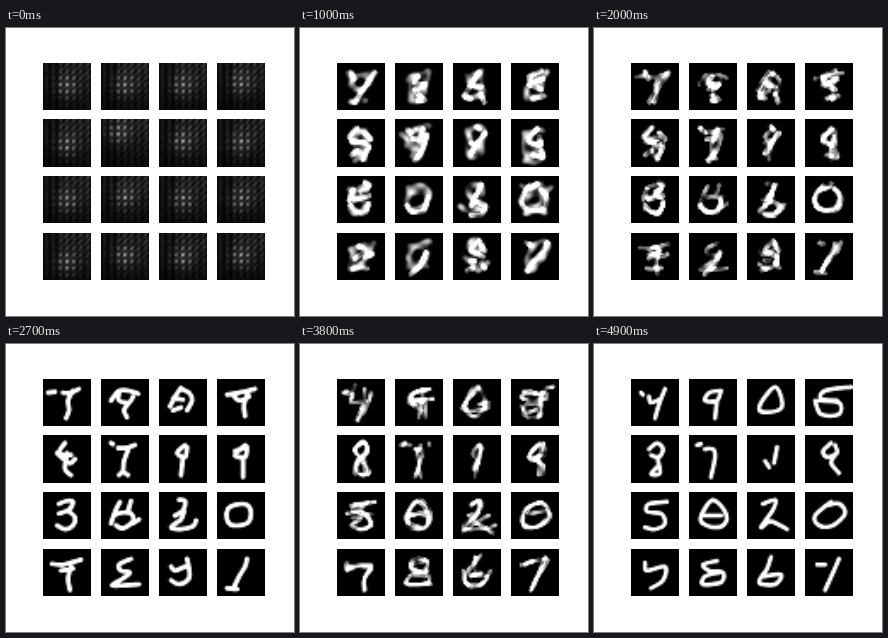
Write an HTML page with a canvas that moves like this. It is 288 by 288 pixels and loops after 5.1 s.

```html
<!DOCTYPE html>
<html>
<head>
<meta charset="utf-8">
<style>
html, body { margin: 0; width: 100%; height: 100%; overflow: hidden; background: #fff; }
canvas { display: block; }
</style>
</head>
<body>
<canvas id="stage" width="288" height="288"></canvas>
<script>
const N = 28, LOOP = 5100, STEP = 100, LAST = 49;
const KEYS = [0, 6, 14, 27, 34, 42, 49];
const WIDTHS = [6.8, 5.4, 4.6, 4.4, 4.3, 4.2];
const BLURS = [.9, .7, .7, .6, .55, .5];
const stage = document.getElementById('stage').getContext('2d');
const tile = document.createElement('canvas');
tile.width = tile.height = N;
const pen = tile.getContext('2d', { willReadFrequently: true });
const clamp = v => Math.max(0, Math.min(1, v));
const cells = [];

function rand(seed) {
  const s = Math.sin(seed * 127.1 + 11.7) * 43758.5453;
  return s - Math.floor(s);
}

// Untrained look: dark stripes with a lattice of bright dots near the middle
function lattice(id) {
  const field = new Float32Array(N * N);
  let cx = 13.5, cy = 11 + rand(id) * 3;
  if (id === 5) { cx = 10; cy = 7; }
  if (id === 12) cy = 17;
  const wave = (v, start) => .5 + .5 * Math.cos((v - start) * Math.PI / 2);
  for (let y = 0; y < N; y++) for (let x = 0; x < N; x++) {
    const near = Math.exp(-((x - cx) ** 2 + (y - cy) ** 2) / 42);
    const grain = .6 + .4 * rand(id * 900 + y * N + x);
    const sx = wave(x, 9.5), sy = wave(y, 8.4);
    const upper = clamp(1.15 - y / N);
    let v = (.03 + .1 * sx) * grain * (.4 + .6 * upper);
    if (x > 9) v += .14 * wave(x + y, 18) * upper * grain;
    v += near * (.08 + .8 * sx ** 2 * sy ** 2 * grain);
    field[y * N + x] = v;
  }
  return field;
}

// Smooth curve through the listed points
function trace(points) {
  const end = points.length - 1;
  const closed = end > 2 && points[0].join() === points[end].join();
  const at = i => closed ? points[(i + end) % end] : points[Math.max(0, Math.min(end, i))];
  pen.moveTo(...points[0]);
  for (let i = 0; i < end; i++) {
    const [a, b, c, d] = [at(i - 1), at(i), at(i + 1), at(i + 2)];
    pen.bezierCurveTo(
      b[0] + (c[0] - a[0]) / 6, b[1] + (c[1] - a[1]) / 6,
      c[0] - (d[0] - b[0]) / 6, c[1] - (d[1] - b[1]) / 6, ...c);
  }
}

function glyph(path, key) {
  pen.setTransform(1, 0, 0, 1, 0, 0);
  pen.clearRect(0, 0, N, N);
  pen.scale(N / 48, N / 48);
  pen.filter = `blur(${BLURS[key]}px)`;
  pen.lineCap = pen.lineJoin = 'round';
  pen.lineWidth = WIDTHS[key];
  pen.strokeStyle = '#fff';
  pen.beginPath();
  for (const line of path.slice(1).split('M')) trace(line.split('L').map(p => p.split(' ').map(Number)));
  pen.stroke();
  pen.filter = 'none';
  const { data } = pen.getImageData(0, 0, N, N);
  return Float32Array.from({ length: N * N }, (_, i) => clamp(data[i * 4 + 3] / 255 * 1.2 - .05));
}

// One tile: its drawing at each key moment
function cell(...paths) {
  cells.push([lattice(cells.length), ...paths.map(glyph)]);
}

cell('M11 10L18 14L30 12L35 8M17 15L14 24L20 27L30 25L32 13M14 40L28 38',
  'M14 9L17 16M38 10L28 24L18 40',
  'M5 14L12 13M20 14L28 14L36 10M30 12L25 22L26 32L23 40',
  'M8 15L14 14L18 6M34 14L30 28L22 42',
  'M6 14L10 12M16 16L14 24L28 22M28 10L26 26L20 42',
  'M10 14L12 16M18 18L20 24L30 20M34 10L28 26L24 40');
cell('M12 16L18 13L28 12L34 8M32 12L30 24L24 29L17 27L18 17M17 28L15 38L24 39L30 30',
  'M23 14L20 20L30 22M28 24L20 27M24 33L30 38L23 38',
  'M10 22L18 12L28 12L37 15M18 14L18 22L28 24L32 18M28 24L23 32L26 39',
  'M36 10L18 14L16 22L38 20M28 14L24 40M14 24L26 32',
  'M34 10L20 14L16 22L30 20M18 26L30 24L30 40',
  'M30 12L20 14L16 22L28 22L32 12M28 22L26 40');
cell('M14 12L22 12L29 8M27 10L26 17L16 19M20 23L28 22M11 34L20 35L32 31L28 26',
  'M26 10L18 22L12 34L18 36M22 24L28 24M28 32L31 40',
  'M22 9L16 18L11 28M22 10L30 14L33 22L28 32M14 20L24 21M14 32L22 29',
  'M22 8L14 20L14 34L24 38L32 28L30 16L22 8',
  'M26 8L10 28L14 32L34 30L36 24L26 26',
  'M28 8L18 18L12 30L18 34L34 30L34 18L28 8');
cell('M36 9L26 13L17 22L15 34L19 38L28 30L32 18L34 10',
  'M30 8L18 14L22 20L32 16M18 22L30 27M22 36L33 34',
  'M10 16L22 14L38 10M16 16L22 22L32 18M32 12L27 26L28 38',
  'M42 8L32 12L28 38M10 18L16 12L28 16M10 28L16 34L28 30',
  'M12 12L18 16L34 14L36 20M12 20L20 22L34 20M16 26L12 34L20 40L30 36L30 26L16 26',
  'M46 8L20 12L16 20L32 22M10 22L16 36L34 36L34 24L14 22');

cell('M14 14L20 13L30 12L29 20L18 24L17 14M18 24L30 26L29 33L16 33M18 41L28 40',
  'M20 9L12 18M14 22L28 24M28 14L34 20M14 36L20 32M26 40L32 28',
  'M22 8L16 18L28 20M14 18L26 28L32 24M24 18L22 34L28 40',
  'M26 8L18 14L22 22L30 18L30 10L26 8M22 24L18 32L26 40L28 32L22 24',
  'M26 6L18 14L24 20L30 14L26 6M24 20L18 38L32 38L26 22',
  'M18 14L26 8L32 14L28 22L20 20M26 22L29 38L20 39L26 32');
cell('M6 16L14 13L26 9L34 7M12 20L20 22L28 20L30 11M11 28L20 29L28 28L24 38L17 37',
  'M12 10L16 14M18 20L32 18M32 16L28 30L20 42M28 10L24 22',
  'M17 13L24 13L34 10M28 13L23 26L22 36L18 40M24 38L27 40M10 8L12 9',
  'M6 10L10 8M26 10L22 20L24 30L20 42M34 8L34 10',
  'M9 10L15 10M20 14L28 16L24 30L26 42',
  'M8 10L12 9M16 14L24 14L26 22L22 42');
cell('M14 11L24 8L31 10L29 22L28 34L18 38L15 30L17 20L14 11M22 26L22 34',
  'M24 8L26 10M32 14L24 24L18 34M18 24L24 26',
  'M26 10L18 18L26 22L28 12M24 22L22 40',
  'M26 10L20 18L24 22L28 14L26 10M26 20L22 42',
  'M28 12L26 26L20 34L24 26',
  'M30 12L27 28M18 26L22 32');
cell('M12 14L22 13L32 11M15 14L14 25L30 24M14 27L15 35L30 33M13 42L22 43L30 40',
  'M26 10L18 22L30 26M28 18L30 24M22 36L32 38L31 32',
  'M28 10L18 20L28 22L30 14M26 22L26 42M18 16L30 12',
  'M28 10L18 20L22 26L30 18L28 10M28 24L28 40',
  'M28 8L18 22L34 20M32 8L34 16M22 24L32 30L32 40',
  'M26 8L18 16L22 22L32 18L30 10M30 20L26 28L34 38');

cell('M12 14L24 12L34 9M15 14L15 24L28 22M14 27L15 37L25 36L30 30',
  'M28 6L32 10M16 14L12 24M18 24L32 20M14 30L20 36L28 38L32 28M24 16L30 14',
  'M16 12L24 9L30 10L26 18L16 22M26 20L32 26L30 34L22 38L14 34',
  'M14 14L30 10L20 20L10 22M16 26L36 22M30 26L34 34L22 38',
  'M38 10L20 14L16 20L28 22L34 32L26 38L14 34L24 28',
  'M36 10L18 12L16 20L30 22L34 32L24 38L14 36');
cell('M13 12L22 10L31 12L34 22L30 31L17 34L13 26L14 14M15 16L30 17',
  'M12 30L16 36L28 36L33 22',
  'M19 10L14 20L10 32M14 23L22 21L30 22L32 30L22 37L15 34M30 9L27 20M32 32L38 28',
  'M20 10L14 20L14 36L32 36L30 16L20 10M14 24L30 24',
  'M24 8L12 22L12 30L28 36L36 26L32 14L24 8M14 24L30 20',
  'M24 8L14 20L12 30L24 36L36 32L36 20L24 8M14 24L32 24');
cell('M18 10L28 9L29 18L20 22L15 16L18 10M7 30L14 35L26 34L36 32M26 22L20 28',
  'M28 9L22 22L18 30M22 26L32 30L28 40L18 40',
  'M20 8L26 9L24 19L16 24M25 20L22 28L12 36L22 38L34 35L37 29',
  'M18 12L26 10L24 20L16 24M26 22L10 36L28 38L42 34M36 24L28 28',
  'M18 14L26 8L28 16L14 36L24 32L40 42M10 40L24 30',
  'M16 12L28 8L26 18L14 36L24 30L40 38');
cell('M11 10L20 11L32 8M13 26L22 18L32 20L30 29L20 32L13 26M30 18L40 12M14 38L26 36L34 37',
  'M18 10L10 24L16 34L32 34L36 22L30 14M20 12L26 8',
  'M11 17L18 13L30 13L34 22L30 32L16 34L10 28L11 17',
  'M20 14L12 28L14 36L28 34L38 22L32 12L20 14',
  'M30 10L14 18L12 32L24 36L38 28L36 20L18 22',
  'M26 10L10 24L14 34L28 34L40 22L34 12L20 14');

cell('M13 16L24 14L36 10M34 14L30 26L18 36L13 34L16 24L20 16',
  'M22 14L28 18L18 26M28 24L36 22M16 36L30 36',
  'M9 15L20 16L38 11M18 22L30 20M28 18L25 30L27 42',
  'M12 18L34 16L28 28L26 42M10 22L14 18',
  'M10 14L10 20L34 18L28 30L28 42',
  'M14 14L16 22L34 18L32 32L20 40');
cell('M14 14L24 12L36 8M17 14L14 24L18 30L28 28L32 20L28 14M12 36L18 34L32 35',
  'M31 20L26 32L16 42',
  'M30 10L18 16L20 22L29 24L22 30L11 37L24 37L38 36',
  'M30 12L16 16L18 22L30 24M30 20L34 34L12 36L14 28',
  'M20 10L16 18L30 24L32 12L20 10M16 26L30 28M14 36L36 36',
  'M28 12L14 16L20 22L34 24L32 34L14 36L16 28L30 24');
cell('M18 8L28 8L27 17L17 18L18 8M12 26L20 30L24 38L34 30',
  'M26 8L18 18L30 24M28 12L32 18M18 28L22 28M14 38L20 36M28 30L32 36',
  'M12 18L16 22L26 18M28 10L30 20L30 30L20 36L12 32',
  'M22 8L22 22M10 22L14 36L26 38L38 22M18 28L28 24',
  'M28 6L14 24L12 34L28 36L34 28L16 26',
  'M24 8L20 20L12 34L28 36L34 26L16 28');
cell('M20 13L36 9L33 24L24 29L18 24L22 14M17 26L15 38L22 38L28 28',
  'M15 10L19 12M36 10L32 18L22 30L17 38',
  'M30 10L28 18L22 28L16 41M10 40L20 41',
  'M10 16L36 10L28 26L20 42',
  'M14 16L22 12M34 8L28 24L20 42',
  'M12 16L20 16M34 10L28 24L20 42');

const image = pen.createImageData(N, N);

function drawCell(id, frame) {
  let k = 0;
  while (k < KEYS.length - 2 && frame >= KEYS[k + 1]) k++;
  let u = (frame - KEYS[k]) / (KEYS[k + 1] - KEYS[k]);
  if (k === 0) u = Math.sqrt(u);
  const a = cells[id][k], b = cells[id][k + 1];
  const mid = 4 * u * (1 - u), gain = 1 + mid * .8;
  const p = rand(id + frame * 17) * 6.3, q = rand(id + frame * 31) * 6.3;
  for (let i = 0; i < N * N; i++) {
    const x = i % N, y = i / N | 0;
    const v = a[i] + (b[i] - a[i]) * u;
    const drift = Math.sin(x * .55 + p) * Math.sin(y * .5 + q) * mid * Math.min(v, .5) * .5;
    const c = 255 * clamp(.45 + (v + drift - .45) * gain);
    image.data.set([c, c, c, 255], i * 4);
  }
  pen.putImageData(image, 0, 0);
  const top = 34.6 + 56.77 * (id >> 2), y = Math.round(top);
  stage.drawImage(tile, 37 + 58 * (id % 4), y, 48, Math.round(top + 47.3) - y);
}

let shown = -1;
function tick(now) {
  const frame = Math.min(LAST, Math.floor(now % LOOP / STEP));
  if (frame !== shown) {
    shown = frame;
    stage.fillStyle = '#fff';
    stage.fillRect(0, 0, 288, 288);
    cells.forEach((_, id) => drawCell(id, frame));
  }
  requestAnimationFrame(tick);
}
tick(0);
</script>
</body>
</html>
```
